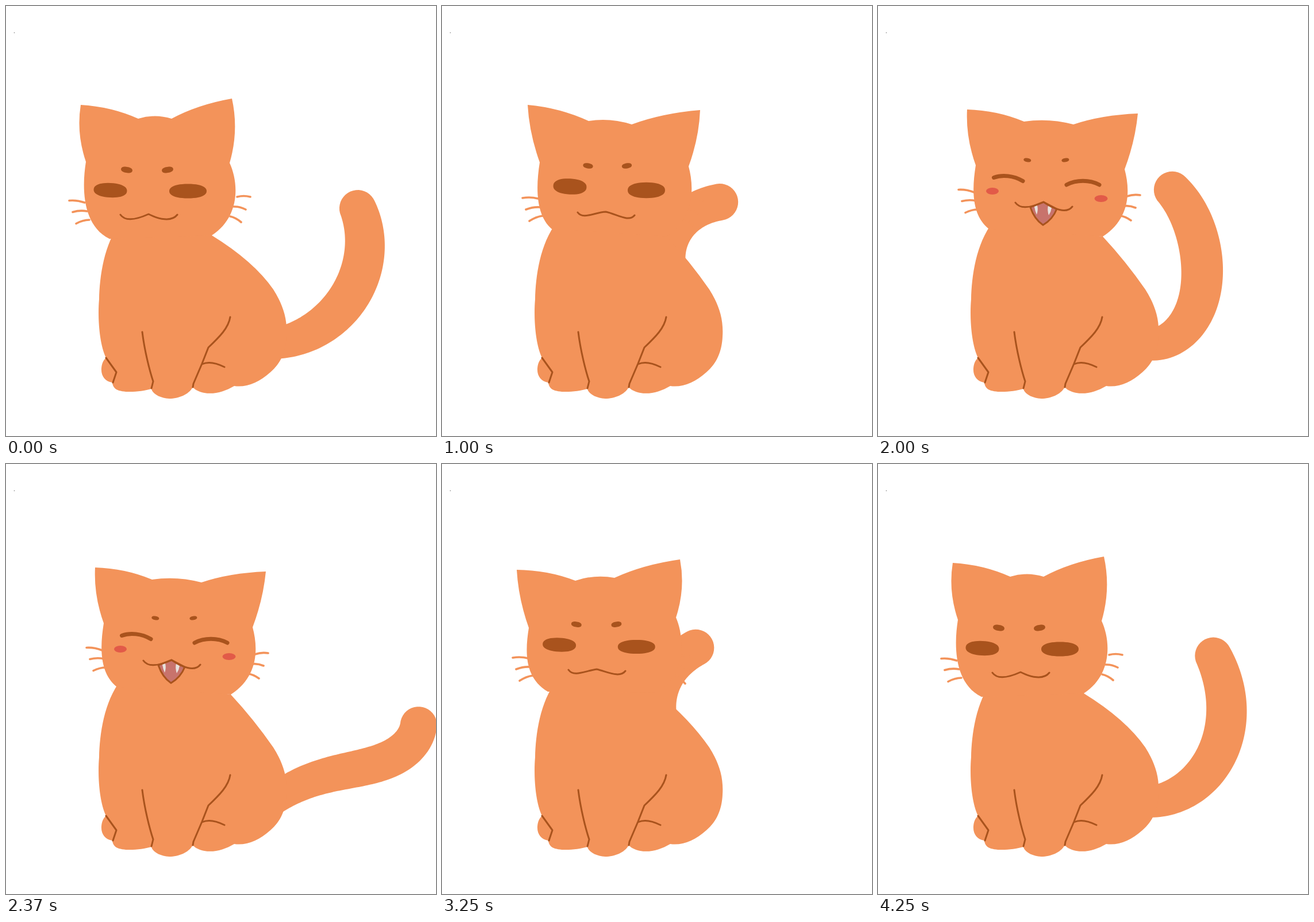
Recreate the animation shown at these times as an HTML page. Size 748x748 px, loop 4370 ms.

```html
<!DOCTYPE html>
<html lang="en">
<head>
<meta charset="utf-8">
<title>Cat wagging its tail</title>
<style>
html, body { margin: 0; width: 100%; height: 100%; overflow: hidden; background: #fff; }
svg { display: block; width: 100vw; height: 100vh; }
.fur { fill: #f3935a; }
.whisk { fill: none; stroke: #f3935a; stroke-width: 3.6; stroke-linecap: round; }
.dark { fill: #a9531d; }
.line { fill: none; stroke: #a9531d; stroke-width: 3; stroke-linecap: round; stroke-linejoin: round; }
</style>
</head>
<body>
<svg viewBox="0 0 748 748">
  <circle cx="14.5" cy="46.5" r=".8" fill="#777"/>
  <path id="tail" class="fur"/>
  <path id="body" class="fur"/>
  <path id="whiskers" class="whisk"/>
  <path id="head" class="fur"/>
  <path class="line" d="M174 612L192 637L186 655M237 567C241 600 250 635 256 653L253 665M390 541C387 560 372 575 352 594L341 622L326 657L325 663M341 623C352 618 366 621 380 628"/>
  <path id="brows" class="dark"/>
  <path id="eyes" class="dark"/>
  <g id="smile">
    <path class="line" style="stroke-width:7" d="M201.500 298.500C216 293 236 295 252 304.500M328 311C345 302 368 302 385 311"/>
    <g fill="#e25a48">
      <ellipse cx="199" cy="322" rx="11" ry="6"/>
      <ellipse cx="388" cy="335" rx="11.500" ry="6"/>
    </g>
    <path class="line" style="fill:#c8736c" d="M265 350Q272 371 287 381Q304 371 311 353L288 341Z"/>
    <path fill="#e8e2dc" d="M272 349L277 347Q279 355 276 363Q273 356 272 349ZM296 347L302 351Q301 358 297 364Q294 355 296 347Z"/>
  </g>
  <path id="mouth" class="line"/>
</svg>
<script>
const LOOP = 4370, STEP = 125;
const $ = id => document.getElementById(id);

// ears and jaw: [tip, inner foot, outer foot, neck] on the left, then on the right
// face: mouth x, y, tilt, mouth peak, eye height, brow size, brow height
// whisk: left root x, y, right root x, y, droop
const left = {
  skull: [130, 172, 230, 196, 139, 271, 180, 405, 393, 161, 288, 196, 389, 273, 358, 399],
  face: [248, 362, 0, 9, 12.5, 10, -77], whisk: [141, 357, 396, 349, 5]
};
const middle = {
  skull: [130, 184, 232, 203, 151, 285, 184, 396, 414, 166, 300, 198, 407, 267, 375, 398],
  face: [269, 357, 2, 3, 12, 9, -78], whisk: [154, 353, 410, 350, 10]
};
const right = {
  skull: [149, 172, 255, 200, 170, 272, 191, 388, 449, 181, 330, 206, 429, 279, 391, 401],
  face: [285, 358, 5, 1, 13.7, 8.7, -80], whisk: [171, 350, 424, 351, 10]
};
const calm = {
  skull: [152, 178, 258, 201, 169, 279, 194, 386, 454, 184, 339, 205, 431, 295, 388, 397],
  face: [286, 347, 8, 8, 14.2, 7, -78.5], whisk: [175, 350, 423, 355, 10]
};
const happy = {
  skull: [155, 180, 254, 201, 170, 277, 193, 388, 452, 187, 340, 206, 429, 284, 391, 401],
  face: [288, 341, 7, 9, 14, 6.5, -73], whisk: [171, 339, 427, 348, 3]
};

const headKeys = [
  [0, left], [1, left], [3, middle], [4, middle], [6, right], [9, right],
  [11, calm], [15, calm], [16, happy], [19, happy], [20, calm], [22, calm],
  [24, right], [25, right], [26, middle], [27, middle], [29, left], [35, left]
];

// Tail: heading in degrees at four even places from root to tip, length, girth
const up = [5, 40, 75, 114, 326, 35], rise = [-1, 47, 86, 117, 340, 35];
const curl = [-10, 66, 101, 134, 341, 36];
const wag = [
  [3, [55, 0, -15, 70, 285, 30]],
  [4, [80, 32, -38, 0, 315, 29]],
  [5, [78, 46, -28, -22, 299, 28.5]],
  [8, [103, 118, 64, 10, 311, 30]],
  [9, [108, 123, 78, 28, 316, 30]],
  [12, [95, 120, 135, 130, 310, 32]]
];
const tailKeys = [
  [0, up], ...wag, [16, curl], [17, rise],
  ...wag.map(([f, p]) => [f + 17, p]), [34, rise], [35, up]
];

const mix = (a, b, k) => a.map((v, i) => v + (b[i] - v) * k);

function between(keys, f) {
  let i = 0;
  while (i < keys.length - 2 && keys[i + 1][0] <= f) i++;
  const [t0, a] = keys[i], [t1, b] = keys[i + 1];
  return [a, b, (f - t0) / (t1 - t0)];
}

const poly = pts => 'M' + pts.map(p => p[0].toFixed(2) + ' ' + p[1].toFixed(2)).join('L') + 'Z';

function blob(cx, cy, rx, ry, deg) {
  const a = deg * Math.PI / 180, pts = [];
  const soft = n => Math.sign(n) * Math.abs(n) ** 0.88;
  for (let i = 0; i < 48; i++) {
    const u = i * Math.PI / 24, x = rx * soft(Math.cos(u)), y = ry * soft(Math.sin(u));
    pts.push([cx + x * Math.cos(a) - y * Math.sin(a), cy + x * Math.sin(a) + y * Math.cos(a)]);
  }
  return poly(pts);
}

// Cubic through values at u = 0, 1/3, 2/3, 1
function cubic([a, b, c, d], u) {
  const t = 3 * u;
  return -a * (t - 1) * (t - 2) * (t - 3) / 6 + b * t * (t - 2) * (t - 3) / 2
    - c * t * (t - 1) * (t - 3) / 2 + d * t * (t - 1) * (t - 2) / 6;
}

function tailPath(p) {
  const n = 80, step = p[4] / n, above = [], below = [], cap = [];
  let x = 460, y = 588;
  for (let i = 0; i <= n; i++) {
    const u = i / n, dir = -cubic(p, u) * Math.PI / 180;
    const r = 26 * (1 - u) * (1 - 2 * u) + p[5] * 4 * u * (1 - u) + 32 * u * (2 * u - 1);
    const edge = turn => [x + r * Math.cos(dir + turn), y + r * Math.sin(dir + turn)];
    above.push(edge(-Math.PI / 2));
    below.unshift(edge(Math.PI / 2));
    if (i === n) for (let k = 1; k < 20; k++) cap.push(edge(Math.PI * (k / 20 - 0.5)));
    x += step * Math.cos(dir);
    y += step * Math.sin(dir);
  }
  return poly([...above, ...cap, ...below]);
}

function headPath([ltx, lty, lix, liy, lox, loy, lnx, lny, rtx, rty, rix, riy, rox, roy, rnx, rny]) {
  const puff = (tip, foot) => 16 - 0.4 * Math.abs(tip - foot);
  const mid = (a, b) => (a + b) / 2;
  const cheekL = lox - 7, cheekR = rnx + 48;
  return `M${ltx} ${lty}Q${mid(ltx, lix) + 3} ${mid(lty, liy) - 9} ${lix} ${liy}` +
    `Q${mid(lix, rix)} ${mid(liy, riy) - 9} ${rix} ${riy}` +
    `Q${mid(rtx, rix) - 7} ${mid(rty, riy) - 7} ${rtx} ${rty}` +
    `Q${mid(rtx, rox) + puff(rtx, rox)} ${mid(rty, roy)} ${rox} ${roy}` +
    `C${cheekR} ${roy + 37} ${cheekR} ${rny - 31} ${rnx} ${rny}L${lnx} ${lny}` +
    `C${cheekL} ${lny - 24} ${cheekL} ${loy + 44} ${lox} ${loy}` +
    `Q${mid(ltx, lox) - puff(ltx, lox)} ${mid(lty, loy)} ${ltx} ${lty}Z`;
}

function whiskerPath([lx, ly, rx, ry, droop]) {
  const hair = (x, y, dx, dy) => `M${x} ${y}q${dx / 2} ${dy / 2 - 3} ${dx} ${dy}`;
  return [-1, 0, 1].map(i =>
    hair(lx + 4 * i, ly + 15 * i, 2 * i - 25, droop / 2 - 1 + 5 * i) +
    hair(rx - 6 * i, ry + 17 * i, 21 - 2 * i, droop + 5 * i)).join('');
}

const mouthPath = ([x, y, tilt, peak]) =>
  `M${x - 49} ${y + 1}c9 13 29 ${peak - 1} 49 -1` +
  `c18 ${peak + tilt / 2} 40 ${14 + tilt} 50 ${1 + tilt}`;

const eyePath = ([x, y, tilt, , open]) =>
  blob(x - 66.5 + 0.8 * tilt, y - 41.5 - 0.5 * tilt, 29, open, 3) +
  blob(x + 68.5 + 0.4 * tilt, y - 40 + 0.5 * tilt, 32.5, open, 0);

const browPath = ([x, y, tilt, , , size, lift]) =>
  blob(x - 38 + 1.4 * tilt, y + lift, size, size * 0.52, 10) +
  blob(x + 33 + 0.7 * tilt, y + lift, size, size * 0.52, -10);

const bodyPath = (x, y) => `M174 612C163 590 159 545 162 510C163 470 170 415 200 375L${x} ${y}` +
  'Q431 444 465 493C482 520 490 545 488 575C487 600 478 622 460 637C440 655 418 664 397 661' +
  'C380 671 362 676 345 673C335 671 328 667 325 663C318 676 300 683 284 683C268 682 255 675 253 666' +
  'C235 671 205 674 192 667C187 664 185 658 185 655C172 653 165 643 166 630C167 620 170 616 174 612Z';

const set = (id, d) => $(id).setAttribute('d', d);
let shown = -1;

function draw(f) {
  const [a, b, k] = between(headKeys, f);
  const [skull, face, whisk] = ['skull', 'face', 'whisk'].map(n => mix(a[n], b[n], k));
  const smiling = a === happy;
  set('tail', tailPath(mix(...between(tailKeys, f))));
  set('body', bodyPath(...skull.slice(-2)));
  set('head', headPath(skull));
  set('whiskers', whiskerPath(whisk));
  set('brows', browPath(face));
  set('eyes', smiling ? '' : eyePath(face));
  set('mouth', mouthPath(face));
  $('smile').style.display = smiling ? '' : 'none';
}

const start = performance.now();
function tick() {
  const t = (performance.now() - start) % LOOP;
  const f = Math.min(34, Math.floor((t + 5) / STEP));
  if (f !== shown) draw(shown = f);
  requestAnimationFrame(tick);
}
tick();
</script>
</body>
</html>
```
